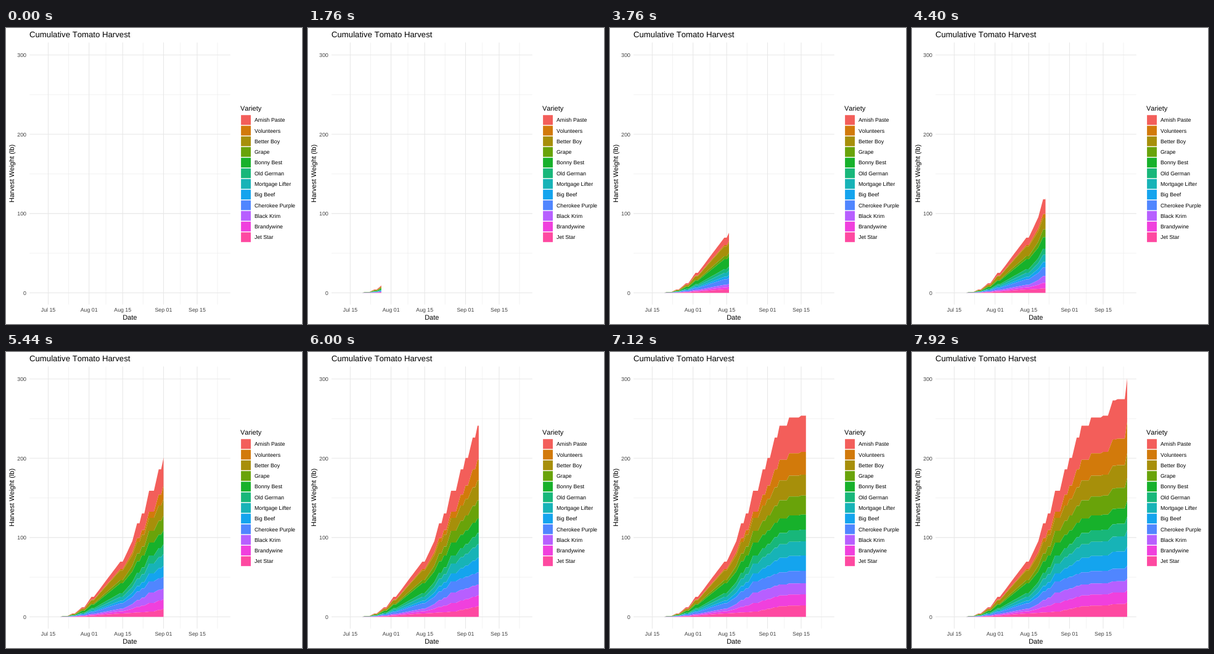
Write an HTML page that moves like this. It is 480x480 px and loops after 8000 ms.

```html
<!DOCTYPE html>
<html lang="en">
<head>
<meta charset="utf-8">
<title>Cumulative Tomato Harvest</title>
<style>
html, body { margin: 0; width: 100%; height: 100%; overflow: hidden; background: #fff; }
svg { display: block; width: 100vw; height: 100vh; }
text {
  font-family: "Liberation Sans", Arial, sans-serif;
  font-kerning: none;
  text-rendering: geometricPrecision;
}
</style>
</head>
<body>
<svg id="chart" viewBox="0 0 480 480">
  <defs><clipPath id="reveal"><rect id="window" x="0" y="0" width="0" height="480"/></clipPath></defs>
  <g id="grid"></g>
  <g id="areas" clip-path="url(#reveal)"></g>
  <g id="labels"></g>
</svg>
<script>
const LOOP = 8000, STEP = 80, LAST_STEP = 99, DAYS = 76;
const dayX = d => 52.9 + d * 3.895;       // day 0 is 11 July
const weightY = w => 429.5 - w * 1.286;

// Name, colour, pounds picked early, midway and late in the season
const varieties = [
  ["Amish Paste", "#f35e5a", 9.3, 26.4, 45.5],
  ["Volunteers", "#d27a0b", 1.6, 7.8, 28.8],
  ["Better Boy", "#a78f0a", 12.4, 16.3, 26.4],
  ["Grape", "#69a30a", 3.9, 14.8, 24.1],
  ["Bonny Best", "#17b12b", 12.4, 16.3, 18.7],
  ["Old German", "#18b77a", 4.7, 10.1, 14.8],
  ["Mortgage Lifter", "#17b3b7", 5, 12.4, 17.9],
  ["Big Beef", "#14a4ee", 3.1, 10.1, 19.4],
  ["Cherokee Purple", "#5086ff", 7, 14, 15.6],
  ["Black Krim", "#b75fff", 3.1, 13.2, 14],
  ["Brandywine", "#f040dd", 2.7, 10.9, 14],
  ["Jet Star", "#fe49a1", 4.3, 6.6, 14.4]
];

// Day, total reached, days without picking afterwards; steady growth between
const harvest = [
  [9, 0], [10, 1.2, 2], [14, 4.2, 1], [18, 12, 1], [22, 25.2, 1], [28, 45.5],
  [34, 69.5, 1], [39, 95.5], [41, 118, 1], [43, 130.5, 1], [46, 159, 2],
  [50, 186, 1], [52, 200.4, 1], [55, 226, 1], [57, 241, 3], [61, 251.4, 4],
  [66, 253.6, 2], [70, 273, 1], [72, 274.5, 3], [76, 300.7]
].flatMap(([day, total, rest]) => rest ? [[day, total], [day + rest, total]] : [[day, total]]);

// Straight lines through points, the last one carried on
function interpolate(points, x) {
  let i = 1;
  while (i < points.length - 1 && points[i][0] < x) i++;
  const [x0, y0] = points[i - 1], [x1, y1] = points[i];
  return y0 + (y1 - y0) * (x - x0) / (x1 - x0);
}

const seasonTotals = [2, 3, 4].map(k => varieties.reduce((sum, v) => sum + v[k], 0));

// Layer borders from the top of the stack down to zero
function bordersAt(day) {
  const total = interpolate(harvest, day);
  const parts = varieties.map(([, , ...pounds]) =>
    interpolate([[0, 0], ...pounds.map((w, k) => [seasonTotals[k], w])], total));
  let left = total;
  return [total, ...parts.map(w => left -= w)].map(weightY);
}

const byId = id => document.getElementById(id);
function add(parent, tag, attrs, text) {
  const el = document.createElementNS("http://www.w3.org/2000/svg", tag);
  for (const k in attrs) el.setAttribute(k, attrs[k]);
  if (text) el.textContent = text;
  byId(parent).appendChild(el);
}
const label = (text, x, y, size, anchor = "start", fill = "#000", extra = {}) =>
  add("labels", "text", { x, y, "font-size": size, "text-anchor": anchor, fill, ...extra }, text);
const line = (d, width) => add("grid", "path", { d, stroke: "#e7e7e7", "stroke-width": width });
const vline = (day, width) => line(`M${dayX(day)} 23.6V448.4`, width);
const hline = (w, width) => line(`M38.1 ${weightY(w)}H363.8`, width);

function drawAxes() {
  const grey = "#404040", major = 1.07, minor = .53;
  [12.5, 28, 43.5, 59, 74.5].forEach(d => vline(d, minor));
  [50, 150, 250].forEach(w => hline(w, minor));
  [["Jul 15", 4], ["Aug 01", 21], ["Aug 15", 35], ["Sep 01", 52], ["Sep 15", 66]].forEach(([name, d]) => {
    vline(d, major);
    label(name, dayX(d), 460, 8.8, "middle", grey);
  });
  [0, 100, 200, 300].forEach(w => {
    hline(w, major);
    label(String(w), 33, weightY(w) + 3.3, 8.8, "end", grey);
  });
  label("Cumulative Tomato Harvest", 38, 15, 13.2);
  label("Date", 200.8, 473, 11, "middle");
  label("Harvest Weight (lb)", 0, 0, 11, "middle", "#000", { transform: "translate(13.3 236) rotate(-90)" });
}

function drawLegend() {
  label("Variety", 380, 134, 11);
  varieties.forEach(([name, fill], i) => {
    const y = 149 + i * 17.28;
    add("labels", "rect", { x: 381.1, y: y - 7.75, width: 15.86, height: 15.86, fill });
    label(name, 403, y + 3.3, 8.8);
  });
}

function drawAreas() {
  const stack = [];
  for (let d = harvest[0][0]; d <= DAYS; d++) stack.push([dayX(d), bordersAt(d)]);
  const border = j => stack.map(([x, ys]) => `${x.toFixed(2)},${ys[j].toFixed(2)}`);
  varieties.forEach(([, fill], j) =>
    add("areas", "polygon", { points: [...border(j), ...border(j + 1).reverse()].join(" "), fill }));
}

// Each day lands on a whole step; steps in between are interpolated
const dayStep = d => Math.round(d * LAST_STEP / DAYS);
const calendar = Array.from({ length: DAYS + 1 }, (_, d) => [dayStep(d), d]);

function render(ms) {
  const step = Math.floor((ms % LOOP) / STEP);
  byId("window").setAttribute("width", dayX(interpolate(calendar, step)));
}

drawAxes();
drawLegend();
drawAreas();
render(0);
const start = performance.now();
(function tick() {
  render(performance.now() - start);
  requestAnimationFrame(tick);
})();
</script>
</body>
</html>
```
